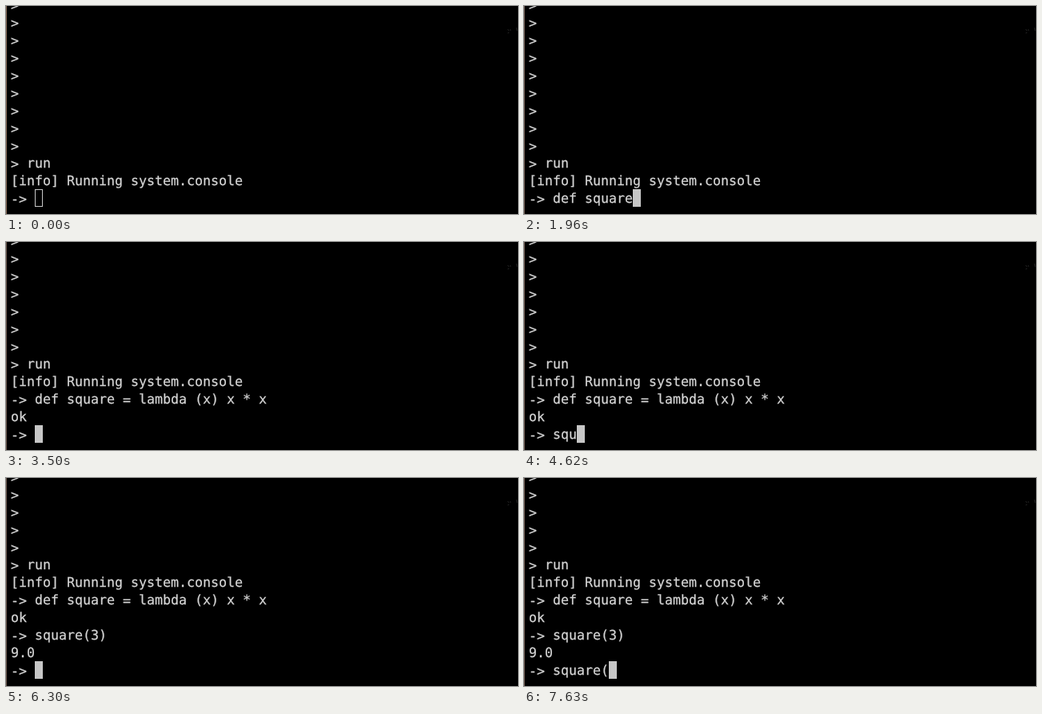
Animation, 640 px wide and 260 px high, one loop 8000 ms. Source, as an HTML page:

```html
<!DOCTYPE html>
<html lang="en">
<head>
<meta charset="utf-8">
<title>Console session</title>
<style>
  html, body { margin: 0; width: 100%; height: 100%; overflow: hidden; background: #000; }
  svg { display: block; width: 640px; height: 260px; background: #000; }
  text {
    font-family: "DejaVu Sans Mono", monospace;
    font-size: 16.61px;
    fill: #d4d4d4;
    stroke: #d4d4d4;
    stroke-width: 0.25px;
    white-space: pre;
    text-rendering: geometricPrecision;
  }
  .operator { baseline-shift: -1px; }
</style>
</head>
<body>
<svg id="stage" viewBox="0 0 640 260">
  <rect id="edge" width="1" height="260"/>
  <path d="M627 29l2 2m0 2l-2 1m3 -5l1 2m7 -4l1 4" stroke="#222" fill="none"/>
  <g id="rows"></g>
  <rect id="cursor"/>
</svg>
<script>
const LOOP = 8000, ROWS = 12, LEFT = 6, CELL = 10, LINE = 22, BASELINE = 17;
const LAST_TOP = 229, FOCUS_AT = 420;
const PROMPT = "\n-> ";
const START = ">\n".repeat(9) + "> run\n[info] Running system.console" + PROMPT;

// Each step appends its text to the screen at the given time.
const steps = [
  ...type("def sq", [770, 840, 980, 1120, 1190, 1400]),
  ...type("uare = ", [1680, 1750, 1820, 1960, 2100, 2310, 2520]),
  [2940, "lamb"], [3010, "da ("], [3150, "x) x"], [3220, " * x"],
  [3430, "\n"], [3500, "ok" + PROMPT],
  ...type("square", [4270, 4410, 4620, 4830, 4900, 5040]),
  ...type("(3)", [5320, 5460, 5880]),
  [6230, "\n"], [6300, "9.0" + PROMPT],
  ...type("square(", [6580, 6720, 6860, 7070, 7210, 7420, 7630])
];

function type(text, times) {
  return times.map((time, i) => [time, text[i]]);
}

function createSvg(name, attributes) {
  const element = document.createElementNS("http://www.w3.org/2000/svg", name);
  setAttributes(element, attributes);
  return element;
}

function setAttributes(element, attributes) {
  for (const name in attributes) element.setAttribute(name, attributes[name]);
}

const edge = document.getElementById("edge");
const cursor = document.getElementById("cursor");
const rows = Array.from({ length: ROWS }, (_, i) => {
  const top = LAST_TOP - (ROWS - 1 - i) * LINE;
  const row = createSvg("text", { x: LEFT, y: top + BASELINE });
  return document.getElementById("rows").appendChild(row);
});

// Operators sit slightly lower than the letters around them.
function setLine(row, line) {
  if (row.textContent === line) return;
  row.replaceChildren(...line.split(/([-=>]+)/).filter(Boolean).map(part => {
    const span = createSvg("tspan", /[-=>]/.test(part) ? { class: "operator" } : {});
    span.textContent = part;
    return span;
  }));
}

function drawCursor(column, focused) {
  const inset = focused ? 0 : 0.5;
  setAttributes(cursor, {
    x: LEFT + column * CELL + inset,
    y: LAST_TOP + inset,
    width: CELL - 2 * inset,
    height: LINE - 2 * inset,
    fill: focused ? "#c7c7c7" : "none",
    stroke: focused ? "none" : "#c7c7c7"
  });
}

function render(time) {
  const typed = steps.filter(([at]) => at <= time).map(([, text]) => text).join("");
  const lines = (START + typed).split("\n");
  const visible = lines.slice(-ROWS);
  rows.forEach((row, i) => setLine(row, visible[i]));
  const focused = time >= FOCUS_AT;
  edge.setAttribute("fill", focused ? "#6e5a50" : "#8c6e5a");
  drawCursor(lines[lines.length - 1].length, focused);
}

const startTime = performance.now();
function tick() {
  render((performance.now() - startTime) % LOOP);
  requestAnimationFrame(tick);
}
tick();
</script>
</body>
</html>
```
